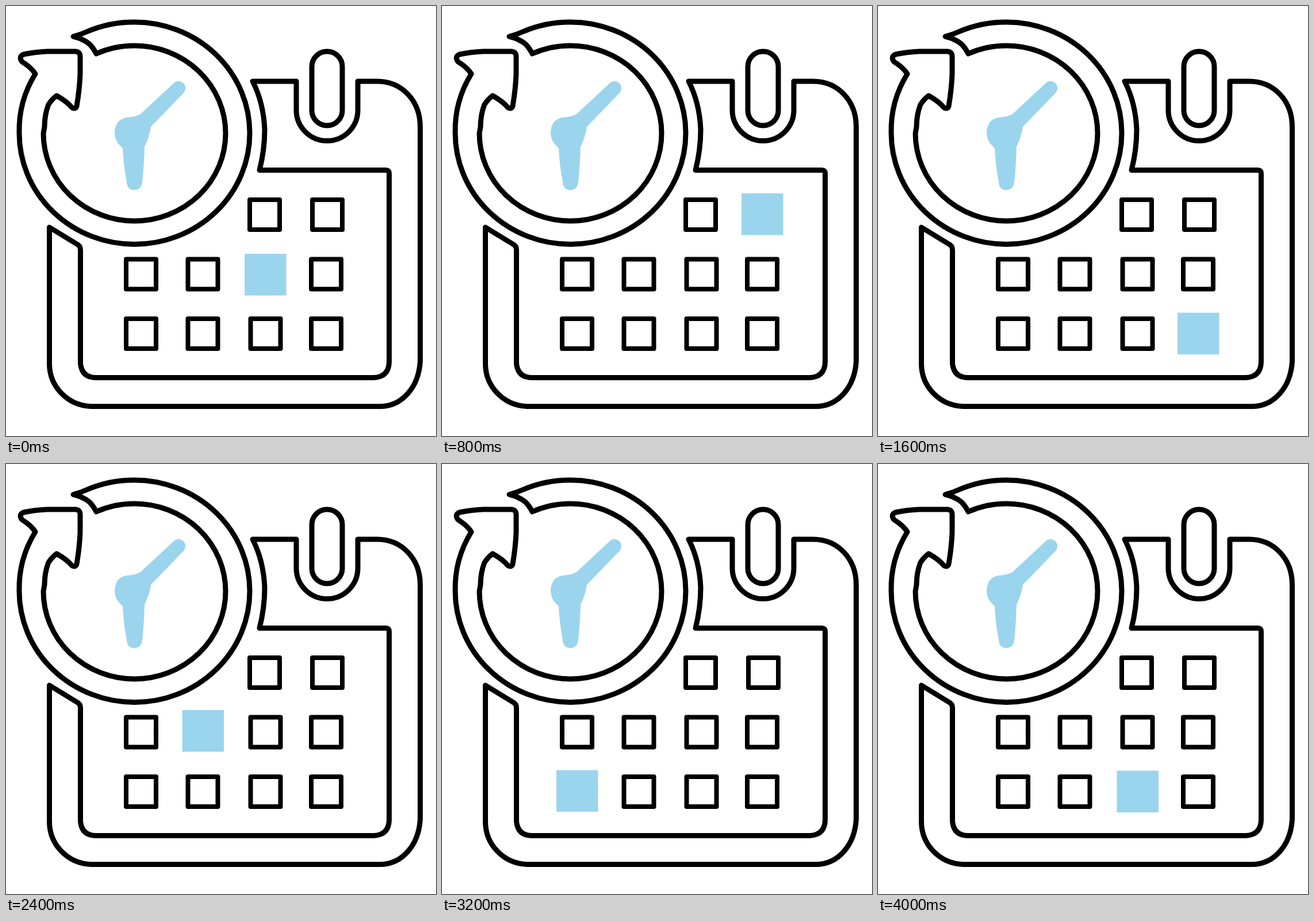
Write an HTML page with a canvas that moves like this. It is 748x748 px and loops after 4800 ms.

```html
<!DOCTYPE html>
<html lang="en">
<head>
<meta charset="utf-8">
<title>Calendar and clock</title>
<style>
  html, body { margin: 0; width: 100%; height: 100%; overflow: hidden; background: #fff; }
  canvas { display: block; }
</style>
</head>
<body>
<canvas id="stage" width="748" height="748"></canvas>
<script>
const ctx = document.getElementById('stage').getContext('2d');
const BLUE = '#9ad5ed';
const STEP = 800;

const clockRing = new Path2D(`M117 53 Q129 50 140 45
  A200.5 193 0 0 1 223.5 28 A200.5 193 0 0 1 424 221
  A200.5 193.5 0 0 1 223.5 414.5 A200.5 193.5 0 0 1 23 221
  A200.5 193 0 0 1 51 118
  Q44 107 28 97 Q21 88 31 84 Q50 80 72 79 L120 79 Q129 79 129 88
  L129 118 Q128 145 123 174 Q121 180 115 177 Q106 166 88 156
  Q79 163 73.6 172 Q67 190 67 210 L65 221.5
  A158.5 152.5 0 0 0 223.5 374 A158.5 152.5 0 0 0 382 221.5
  A158.5 152.5 0 0 0 223.5 69 A158.5 152.5 0 0 0 157 83
  Q152 73 145 66 Q134 57 117 53 Z`);

const calendar = new Path2D(`M429 131 H505 V181 A53.5 53.5 0 0 0 612 181 V131
  H645 C690 131 720.5 166 720.5 210 V618 C718 662 690 696.5 650 696.5
  H148 C107 695 75.5 662 75.5 622 V385
  L123 414 Q129.5 417 129.5 424 V622 Q132 646.5 157 646.5
  H640 Q666 645 666.5 619 V291 Q666.5 285.5 661 285.5 H441
  Q450 250 450 215 Q448 168 429 131 Z`);

const hands = new Path2D(`M292 134 C302 125 318 137 310 150
  L252 210 Q250 226 241 245 Q240 280 237 306 C236 325 210 325 210 306
  Q204 275 203 247 Q189 236 189 220 Q190 198 209 194 Q226 193 234 188 Z`);

const ringPin = new Path2D();
ringPin.roundRect(532, 79, 53, 129, 26.5);

// Outline centre lines of the day boxes, one row per week.
const weeks = [
  { y: 337, days: [424, 533] },
  { y: 440.5, days: [209, 316.5, 425.5, 531] },
  { y: 544, days: [209, 316.5, 425.5, 531] }
];

// Each highlight hides the day it covers.
const marks = [
  { week: 1, day: 2, x: 415, y: 431 },
  { week: 0, day: 1, x: 521, y: 326 },
  { week: 2, day: 3, x: 521, y: 533.5 },
  { week: 1, day: 1, x: 306.5, y: 428 },
  { week: 2, day: 0, x: 199, y: 532.5 },
  { week: 2, day: 2, x: 415.5, y: 533.5 }
];

function draw(mark) {
  ctx.fillStyle = '#fff';
  ctx.fillRect(0, 0, 748, 748);
  ctx.strokeStyle = '#000';
  ctx.lineJoin = 'round';
  ctx.lineWidth = 9;
  [clockRing, calendar, ringPin].forEach(path => ctx.stroke(path));

  ctx.lineWidth = 8;
  weeks.forEach(({ y, days }, week) => days.forEach((x, day) => {
    if (week !== mark.week || day !== mark.day) ctx.strokeRect(x, y, 52, 52);
  }));

  ctx.fillStyle = BLUE;
  ctx.fill(hands);
  ctx.fillRect(mark.x, mark.y, 72.5, 72.5);
}

function tick() {
  draw(marks[Math.floor(performance.now() / STEP) % marks.length]);
  requestAnimationFrame(tick);
}
tick();
</script>
</body>
</html>
```
